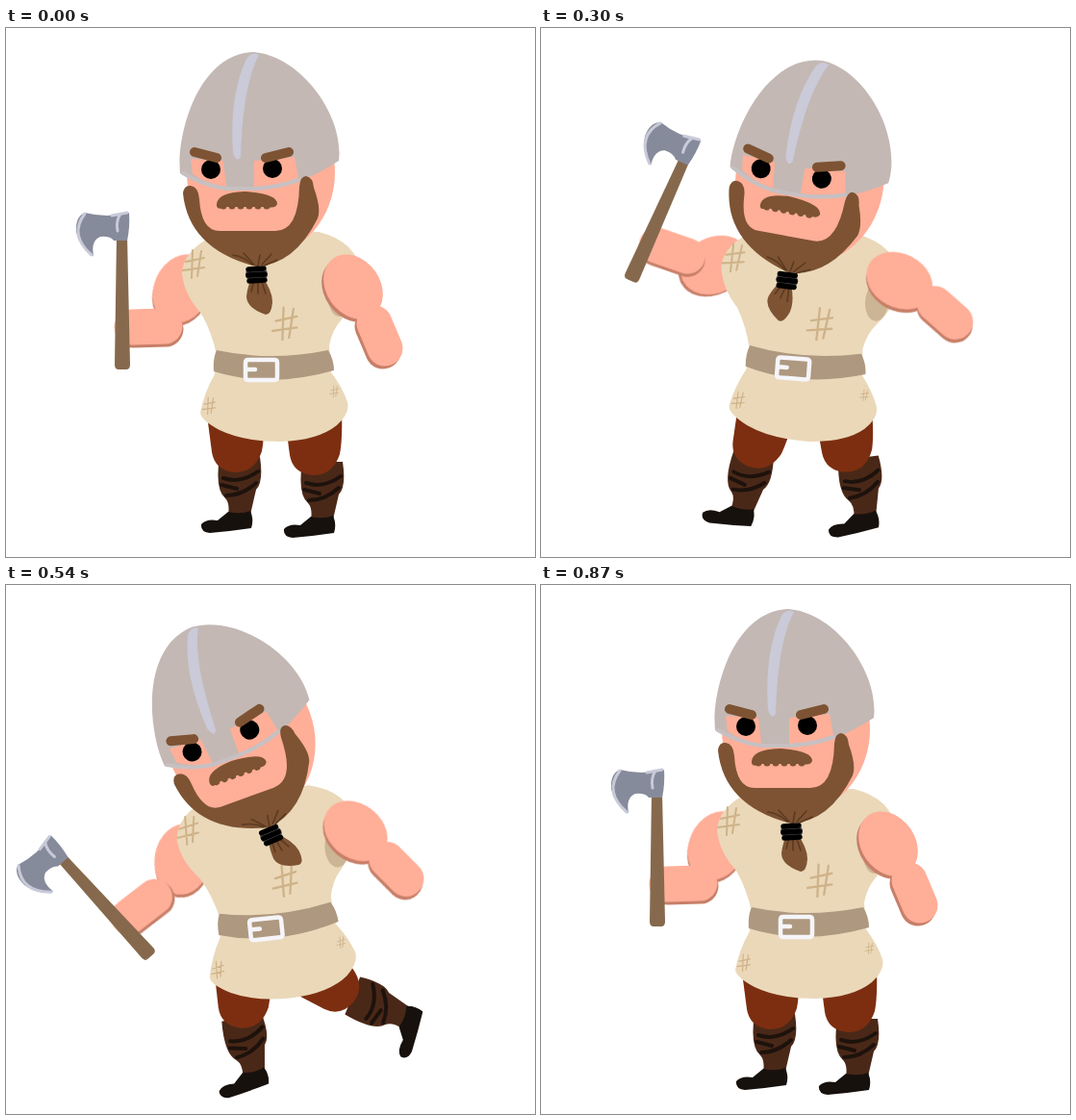
Write an HTML page that moves like this. It is 550x550 px and loops after 900 ms.

```html
<!DOCTYPE html>
<html lang="en">
<head>
<meta charset="utf-8">
<title>Axe swing</title>
<style>
  html, body { margin: 0; width: 100%; height: 100%; overflow: hidden; background: #fff; }
  svg { display: block; width: 100vw; height: 100vh; }
  .line { fill: none; stroke-linecap: round; stroke-linejoin: round; }
  .skin { fill: #ffae98; }
  .fore { stroke: #ffae98; stroke-width: 37; }
  .left { filter: drop-shadow(1px 3px 0 #c77f68); }
  .right { filter: drop-shadow(-2px 3px 0 #c77f68); }
  .hair { fill: #7d5333; }
  .brow { stroke: #7d5333; stroke-width: 10; }
  .strand { stroke: #5c3a20; stroke-width: 1.6; }
  .buckle { stroke: #f5f5fa; stroke-width: 4.5; }
  .steel { stroke: #c8cad9; stroke-width: 3; }
</style>
</head>
<body>
<svg viewBox="0 0 550 550">
  <defs>
    <path id="thigh" fill="#7d2e10" d="M208 395H268Q269 425 266 440Q259 462 238 462Q217 460 214 441Z"/>
    <g id="boot">
      <path fill="#4a2818" d="M222 446H264Q268 472 260 480L254 506H231Q233 494 228 489Q217 480 222 446Z"/>
      <path class="line" stroke="#1d120c" stroke-width="4" d="M226 468Q244 474 262 461M224 475L240 479M229 486Q246 486 260 473"/>
      <path fill="#17110d" d="M231 503Q244 506 254 502Q258 511 255 520Q235 523 212 525Q202 524 203 516Q208 510 220 512Z"/>
    </g>
    <path id="hatch" class="line" stroke="#cfb288" stroke-width="2" d="M-3 -15L-4 14M6 -14L2 12M-10 -3L9 -7M-13 6L9 3"/>
  </defs>

  <!-- Each joint: pivot "x y"; raise and hit "degrees dx dy" relative to its parent. -->
  <g data-pivot="285 310" data-raise="6" data-hit="-6">
    <g data-pivot="206 252" data-raise="49" data-hit="-10">
      <ellipse class="skin left" cx="183" cy="271" rx="29" ry="37" transform="rotate(25 183 271)"/>
    </g>
    <g data-pivot="170 310" data-raise="23 -25 -86" data-hit="-30 -12 -2">
      <path class="line fore left" d="M131 311L165 310"/>
      <g data-pivot="121 313" data-raise="5" data-hit="-6 0 3">
        <path fill="#86694d" d="M115 216H126L129 350Q129 355 125 355H117Q113 355 113 350Z"/>
        <path fill="#868b9b" d="M128 192Q129 207 126 221H112Q108 216 98 217Q88 221 91 237Q76 228 73 212Q72 196 82 192Q105 198 128 192Z"/>
        <path class="line steel" d="M119 193Q114 201 116 211M110 195L126 192"/>
        <path class="line steel" stroke-width="5" d="M82 193Q65 215 89 236"/>
      </g>
    </g>

    <g data-pivot="238 412" data-raise="16" data-hit="7 -3 -6">
      <g data-pivot="243 458" data-raise="-6 -5 3" data-hit="-14 -2 4"><use href="#boot"/></g>
      <use href="#thigh"/>
    </g>
    <g data-pivot="320 412" data-raise="-10 4 -8" data-hit="-49 -11 -7">
      <g data-pivot="329 463" data-raise="-6 6 0" data-hit="-13 -3 9"><use href="#boot" x="86" y="5"/></g>
      <use href="#thigh" x="81" y="3"/>
    </g>

    <path fill="#ead8b9" d="M215 216Q184 232 183 255Q185 277 203 297Q214 316 219 340L217 360Q206 379 202 400Q203 408 222 418Q247 430 285 430Q324 429 344 413Q358 400 355 389Q350 374 338 358L336 330Q339 314 349 303Q366 285 370 258Q366 222 325 212Z"/>
    <ellipse fill="#cbb594" cx="347" cy="280" rx="12" ry="20"/>
    <path fill="#ae987f" d="M219 335Q275 347 335 335Q341 345 341 356Q275 375 216 357Q215 343 219 335Z"/>
    <path class="line buckle" d="M252 345H279Q282 345 282 348V363Q282 366 279 366H252Q249 366 249 363V348Q249 345 252 345ZM251 355H259"/>
    <use href="#hatch" transform="translate(197 246)"/>
    <use href="#hatch" transform="translate(292 308) scale(1.15)"/>
    <use href="#hatch" transform="translate(212 393) scale(.6)"/>
    <use href="#hatch" transform="translate(342 378) scale(.4)"/>

    <g data-pivot="258 172" data-raise="8.5 1 12" data-hit="-14 0 6">
      <ellipse class="skin" cx="265" cy="150" rx="77" ry="87"/>
      <path fill="#c3b8b4" fill-rule="evenodd" d="M181 151C177 110 200 27 257 25C305 28 352 90 346 138Q328 150 304 160Q272 170 229 169Q200 163 181 151Z
        M192 136L226 138L229 165Q208 162 194 152ZM258 138L300 134L304 156Q282 164 258 165Z"/>
      <path class="line" stroke="#c7c0c2" stroke-width="4" d="M184 151Q206 164 229 167H258Q282 166 304 158"/>
      <path fill="#cacad8" d="M250 32Q255 24 263 28Q246 60 244 134Q240 141 236 130Q232 70 250 32Z"/>
      <circle cx="213" cy="147" r="10"/>
      <circle cx="277" cy="146" r="10"/>
      <path class="line brow" d="M196 129L219 135M270 135L294 129"/>
      <path class="hair" d="M184 172Q185 163 192 164Q200 165 201 178Q203 211 222 211H280Q304 211 305 165Q306 154 312 154Q319 155 320 166Q328 188 324 198Q300 246 260 248Q190 230 184 172Z"/>
      <path class="hair" d="M219 185Q218 171 248 170Q282 172 282 183Q280 188 272 186H227Q220 190 219 185Z"/>
      <path class="line" stroke="#7d5333" stroke-width="7" stroke-dasharray="0 9" d="M226 185H273"/>
      <path class="line strand" d="M236 236Q248 238 256 246M247 234L258 246M264 236L262 247M276 235L266 246M282 241L269 247"/>
      <g data-pivot="260 256" data-raise="20" data-hit="-11">
        <path class="hair" d="M256 258H266Q277 273 277 285Q276 298 270 298Q250 291 250 279Q251 269 256 258Z"/>
        <path class="line strand" d="M262 264V276M266 264L270 276M257 266L255 274"/>
      </g>
      <path class="line" stroke="#555" stroke-width="14" d="M256 256H265"/>
      <path class="line" stroke="#000" stroke-width="5.5" d="M252 251L268 250M252 257L269 256M253 263L269 262"/>
    </g>

    <g class="right" data-pivot="352 258" data-raise="-44 5 -9" data-hit="-10 6 -3">
      <ellipse class="skin" cx="361" cy="269" rx="28" ry="36" transform="rotate(-35 361 269)"/>
      <g data-pivot="378 297" data-raise="2" data-hit="-6"><path class="line fore" d="M383 307L394 333"/></g>
    </g>
  </g>
</svg>
<script>
const STEP = 30, LOOP = 900, RAISED = 420, TOP = 450, HIT = 540, BACK = 870;

const numbers = text => text.split(' ').map(Number);
const joints = [...document.querySelectorAll('[data-pivot]')].map(node => ({
  node,
  pivot: numbers(node.dataset.pivot),
  raise: numbers(node.dataset.raise),
  hit: numbers(node.dataset.hit)
}));

// How far the figure is in the raised pose and in the hit pose.
function weights(t) {
  if (t <= TOP) return [t / RAISED, 0];
  if (t <= HIT) {
    const k = (t - TOP) / (HIT - TOP);
    return [(1 - k) * TOP / RAISED, k];
  }
  return [0, Math.max(0, (BACK - t) / (BACK - HIT))];
}

function draw(now) {
  const [up, down] = weights(Math.floor(now % LOOP / STEP) * STEP);
  for (const { node, pivot, raise, hit } of joints) {
    const [angle, dx, dy] = [0, 1, 2].map(i => (raise[i] || 0) * up + (hit[i] || 0) * down);
    node.setAttribute('transform', `translate(${dx} ${dy}) rotate(${angle} ${pivot.join(' ')})`);
  }
}

let start;
function tick(now) {
  start ??= now;
  draw(now - start);
  requestAnimationFrame(tick);
}
draw(0);
requestAnimationFrame(tick);
</script>
</body>
</html>
```
